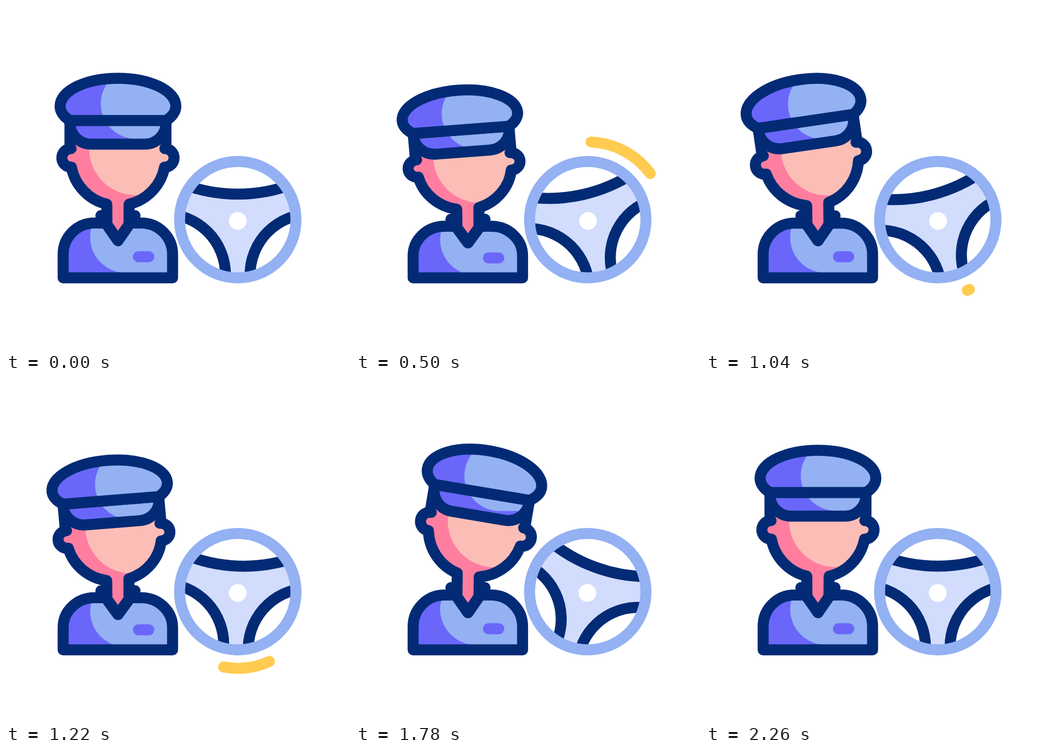
Animation, 640 px wide and 640 px high, one loop 2400 ms. Source, as an HTML page with a canvas:

```html
<!DOCTYPE html>
<html lang="en">
<head>
<meta charset="utf-8">
<title>Driver</title>
<style>
html, body { margin: 0; width: 100%; height: 100%; overflow: hidden; background: #fff; }
canvas { display: block; width: 640px; height: 640px; }
</style>
</head>
<body>
<canvas id="stage" width="640" height="640"></canvas>
<script>
const ctx = document.getElementById('stage').getContext('2d');
const LOOP = 2400, LINE = 20.5, FLOOR = 505.7, MID = 208.3, TAU = Math.PI * 2;
const NAVY = '#032b75', BLUE = '#93b1f3', VIOLET = '#6a66fa', PINK = '#ff7e9f',
      PEACH = '#fdbdb7', PALE = '#d2dcfd', YELLOW = '#ffcb51', WHITE = '#fff';
const WHEEL = { x: 431.2, y: 397.5 };

const TILT = [[200, 0], [600, -5.5], [1000, -8.5], [1400, -2], [1800, 9.6], [2260, 0]];
const LIFT = [[200, 0], [1000, .8], [1400, 0], [1800, 2.5], [2260, 0]];
const DRIFT = [[200, 0], [600, -20], [1000, -24.5], [1400, -.5], [1800, 25.5], [2260, 0]];
const SQUASH = [[200, 0], [600, .07], [1000, 0], [1400, .086], [1800, 0], [2030, .05], [2260, 0]];
const STEER = [[200, 0], [800, -25], [1600, 25], [2200, 0]];

// Each swoosh: radius, start and end angle, times of its leading and trailing end
const SWOOSHES = [
  { r: 144.5, from: -34, to: -97.5, lead: [200, 600], trail: [460, 800] },
  { r: 142.6, from: 65.6, to: 126.6, lead: [1000, 1400], trail: [1260, 1600] }
];

const rad = deg => deg * Math.PI / 180;

function ease(t, a, b) {
  const p = Math.min(1, Math.max(0, (t - a) / (b - a)));
  return p * p * (3 - 2 * p);
}

function track(keys, t) {
  let v = keys[0][1];
  for (let i = 1; i < keys.length; i++) {
    v += (keys[i][1] - keys[i - 1][1]) * ease(t, keys[i - 1][0], keys[i][0]);
  }
  return v;
}

const flat = () => ctx.setTransform(1, 0, 0, 1, 0, 0);

function fill(color) {
  ctx.fillStyle = color;
  ctx.fill();
}

// Outlines keep their weight while the shapes are squashed
function stroke(color) {
  flat();
  ctx.strokeStyle = color;
  ctx.stroke();
}

function disc(x, y, r) {
  ctx.beginPath();
  ctx.arc(x, y, r, 0, TAU);
}

// Outlined shape with a lit area that has a round left edge
function paint(trace, base, lit, x, y, r) {
  ctx.beginPath();
  trace();
  ctx.closePath();
  fill(base);
  ctx.save();
  ctx.clip();
  flat();
  disc(x, y, r);
  ctx.rect(x, y - r, 200, r * 2);
  fill(lit);
  ctx.restore();
  ctx.beginPath();
  trace();
  ctx.closePath();
  stroke(NAVY);
}

function drawDriver(t) {
  const s = 1 - track(SQUASH, t), tilt = rad(track(TILT, t));
  const lift = track(LIFT, t), drift = track(DRIFT, t);
  const bodyY = y => FLOOR - (FLOOR - y) * s;
  const body = () => ctx.setTransform(1, 0, 0, s, 0, FLOOR * (1 - s));
  const head = () => {
    body();
    ctx.translate(MID, 372 - lift);
    ctx.rotate(tilt);
    ctx.translate(-MID, -372);
  };
  const jaw = (a, b) => ctx.arc(MID, 283, 88.3, rad(a), rad(b), true);

  const shirt = () => {
    body();
    ctx.moveTo(106.3, FLOOR);
    ctx.arc(164.5, 462, 58.2, Math.PI, Math.PI * 1.5);
    ctx.lineTo(185.6, 403.8);
    ctx.lineTo(MID, 436.5);
    ctx.lineTo(231, 403.8);
    ctx.arc(251.7, 462, 58.2, -Math.PI / 2, 0);
    ctx.lineTo(309.9, FLOOR);
  };
  const face = () => {
    head();
    ctx.moveTo(119, 213);
    ctx.lineTo(119, 265);
    ctx.arc(121.2, 282.5, 17.3, -Math.PI / 2, Math.PI / 2, true);
    jaw(169, 103.6);
    body();
    ctx.lineTo(187.8, 407);
    ctx.lineTo(MID, 436.5);
    ctx.lineTo(228.8, 407);
    head();
    jaw(76.4, 11);
    ctx.arc(295.4, 282.5, 17.3, Math.PI / 2, -Math.PI / 2, true);
    ctx.lineTo(297.6, 265);
    ctx.lineTo(297.6, 213);
  };
  const visor = () => {
    head();
    ctx.moveTo(119, 213);
    ctx.arc(158, 218, 39, Math.PI, Math.PI / 2, true);
    ctx.arc(258.6, 218, 39, Math.PI / 2, 0, true);
    ctx.lineTo(297.6, 213);
  };
  const crown = () => {
    head();
    ctx.moveTo(119, 213);
    ctx.bezierCurveTo(107, 206, 100.6, 196, 100.6, 186.5);
    ctx.bezierCurveTo(100.6, 157.5, 149, 134.4, MID, 134.4);
    ctx.bezierCurveTo(267.6, 134.4, 316, 157.5, 316, 186.5);
    ctx.bezierCurveTo(316, 196, 309.6, 206, 297.6, 213);
  };

  paint(shirt, VIOLET, BLUE, 223, bodyY(430), 66.5);

  // Badge
  ctx.beginPath();
  ctx.moveTo(246.4, bodyY(466.5));
  ctx.lineTo(265.6, bodyY(466.5));
  stroke(VIOLET);

  paint(face, PINK, PEACH, 241.5 + drift * .64, bodyY(265), 87);

  // Collar
  body();
  ctx.beginPath();
  ctx.moveTo(176.5, 390);
  ctx.lineTo(MID, 436.5);
  ctx.lineTo(240.1, 390);
  stroke(NAVY);

  for (const part of [visor, crown]) {
    paint(part, VIOLET, BLUE, 241.8 + drift, bodyY(181.8), 65.5);
  }
}

function drawWheel(t) {
  ctx.save();
  ctx.translate(WHEEL.x, WHEEL.y);
  ctx.rotate(rad(track(STEER, t)));
  ctx.save();
  disc(0, 0, 106);
  fill(PALE);
  ctx.clip();
  ctx.strokeStyle = NAVY;
  for (const [x, y, r] of [[0, -336.5, 289], [-135.9, 102.5, 113], [135.9, 102.5, 113]]) {
    disc(x, y, r);
    fill(WHITE);
    ctx.stroke();
  }
  ctx.restore();
  disc(0, 2.5, 16.5);
  fill(WHITE);
  disc(0, 0, 108.3);
  ctx.strokeStyle = BLUE;
  ctx.stroke();
  ctx.restore();
}

function drawSwoosh(w, t) {
  const lead = ease(t, ...w.lead), trail = ease(t, ...w.trail);
  if (lead <= trail) return;
  const at = p => rad(w.from + (w.to - w.from) * p);
  ctx.beginPath();
  ctx.arc(WHEEL.x, WHEEL.y, w.r, at(trail), at(lead), w.to < w.from);
  stroke(YELLOW);
}

function draw(t) {
  flat();
  ctx.fillStyle = WHITE;
  ctx.fillRect(0, 0, 640, 640);
  ctx.lineWidth = LINE;
  ctx.lineCap = ctx.lineJoin = 'round';
  drawDriver(t);
  flat();
  drawWheel(t);
  for (const w of SWOOSHES) drawSwoosh(w, t);
}

let start;
function tick(now) {
  if (start === undefined) start = now;
  draw((now - start) % LOOP);
  requestAnimationFrame(tick);
}
draw(0);
requestAnimationFrame(tick);
</script>
</body>
</html>
```
